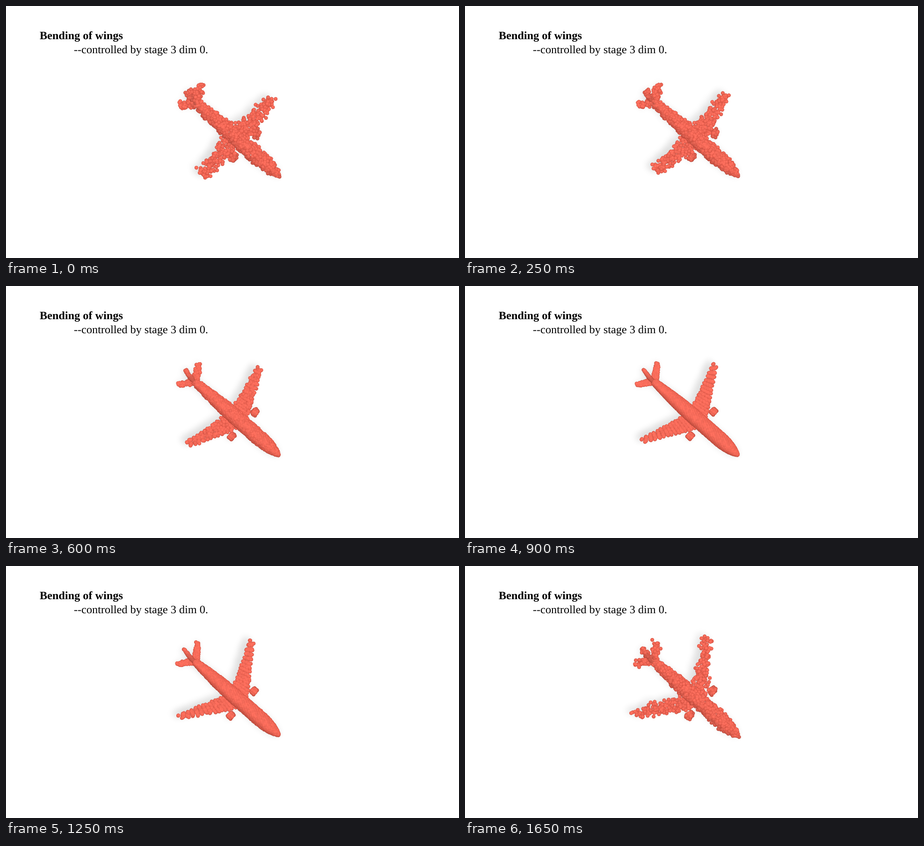
Animation of 968x539 px, one loop 1.7 s. Source, as a matplotlib script:

```python
import numpy as np
import matplotlib.pyplot as plt
from matplotlib.animation import FuncAnimation

plt.rcParams["text.hinting"] = "none"

W, H, DPI = 968, 539, 64
PT = 72 / DPI
TICK = 50

# Poses advance every tick, with a few short and long holds.
POSES, CLEAN = 22, 11
holds = np.ones(POSES, int)
holds[[0, 2, 10, 14, 15, 20]] = 2
holds[[3, 8, 11]] = 3
TIMELINE = np.repeat(np.arange(POSES), holds)

# Plane frame on screen: centre, direction to the nose, direction to one wing.
CENTER = np.array([491, 281])
FORWARD = np.array([0.74, 0.673])
SIDE = np.array([0.69, -0.725])
CAST = np.array([-10, -5])

R = 4.0
# Each ball is a stack of discs, from its dark rim to its lit top.
SHARES = np.array([1, 0.93, 0.8, 0.56])
RIM, TOP = np.array([204, 74, 58]) / 255, np.array([255, 112, 94]) / 255

rng = np.random.default_rng(7)
parts = []


def spread_evenly(n):
    """Low-discrepancy points in the unit square."""
    i = np.arange(1, n + 1)
    return (i * 0.7548777) % 1, (i * 0.5698403) % 1


def mix(a, b, t):
    return a + (b - a) * t


def add(along, across, z, sweep=0, noise=2, shade=1, cast=0.3):
    """Register balls; `sweep` is how far each one swings forward."""
    parts.append(np.broadcast_arrays(along, across, z, sweep, noise, shade, cast))


def add_plate(n, root, tip, sweep, z, noise, shade=(1, 1), cast=0.3, taper=0.5):
    """Tapered plate; root and tip are (rear, front, across)."""
    r, v = spread_evenly(n)
    u = (1 - np.sqrt(1 - r * (1 - taper ** 2))) / (1 - taper)
    along = mix(mix(root[0], root[1], v), mix(tip[0], tip[1], v), u)
    add(along, mix(root[2], tip[2], u), z + 2 * u, sweep * u,
        mix(*noise, u), mix(*shade, u), cast)


def add_body(n):
    t, a = spread_evenly(n)
    turn = np.radians(190) * (a - 0.5)
    rear = 0.35 + 0.65 * np.sin(np.pi / 2 * np.minimum(1, t / 0.5))
    nose = (1 - np.clip((t - 0.78) / 0.22, 0, 1) ** 2) ** 0.75
    half = 13.3 * rear * nose
    along = mix(-116, 122, t)
    add(along, 0.018 * along + half * np.sin(turn), 6 + half * np.cos(turn),
        noise=2.1, shade=1 - 0.2 * np.clip(-np.sin(turn) - 0.35, 0, 1))


def add_engine(n, side):
    t, a = spread_evenly(n)
    ring = 2 * np.pi * a
    add(mix(13, 23, t), side * 36 + 5.5 * np.cos(ring), 5 * np.sin(ring) - 5,
        sweep=9, shade=0.92 + 0.08 * np.sin(ring))


add_body(760)
for side in (1, -1):
    add_plate(190, (-19, 20, side * 13), (-73, -63, side * 112), 70, 3,
              (3, 5), cast=1)
    add_plate(46, (-126, -112, side * 4), (-146, -138, side * 33), 12, 4, (3, 4))
    add_engine(30, side)
add_plate(70, (-130, -107, -4), (-156, -150, 2), 12, 9, (1.5, 3), (0.8, 1))

along, across, depth, sweep, noise, shade, cast = np.hstack(
    [np.array(p, float) for p in parts])
N = len(along)
jitter_early, jitter_late = np.clip(rng.standard_t(6, (2, N, 3)), -2.6, 2.6)
shade = shade * rng.uniform(0.95, 1.01, N)

lift = R * np.sqrt(1 - SHARES ** 2)
tint = mix(RIM, TOP, (lift / lift.max())[:, None] ** 0.8)
shift = 0.5 * np.outer((lift / lift.max()) ** 2, (0.5, -1))
disc_size = np.repeat((2 * R * SHARES * PT) ** 2, N)
disc_color = np.clip(tint[:, None] * shade[:, None], 0, 1).reshape(-1, 3)


def pose(k):
    """Screen positions and heights of the balls in pose k."""
    swing = (1 - k / (POSES - 1)) ** 1.56
    xy = (CENTER + np.outer(along + sweep * swing, FORWARD)
          + np.outer(across, SIDE))
    if k <= CLEAN:
        move = jitter_early * (1 - k / CLEAN)
    else:
        move = 0.8 * jitter_late * ((k - CLEAN) / (POSES - 1 - CLEAN)) ** 2
    move = move * noise[:, None]
    return xy + move[:, :2], depth + move[:, 2]


X0, X1, Y0, Y1, CELL = 300, 639, 120, 420, 3
xe, ye = np.arange(X0, X1 + 1, CELL), np.arange(Y0, Y1 + 1, CELL)


def blur_matrix(n, sigma=7):
    d = np.subtract.outer(np.arange(n), np.arange(n)) * CELL
    g = np.exp(-d ** 2 / (2 * sigma ** 2))
    return g / g.sum(1).max()


BX, BY = blur_matrix(len(xe) - 1), blur_matrix(len(ye) - 1)


def shadow(xy):
    x, y = (xy + np.outer(cast, CAST)).T
    dens = np.histogram2d(y, x, bins=(ye, xe), weights=cast)[0]
    return 1 - 0.17 * (1 - np.exp(-2 * (BY @ dens @ BX)))


fig = plt.figure(figsize=(W / DPI, H / DPI), dpi=DPI, facecolor="white")
ax = fig.add_axes([0, 0, 1, 1])
ax.axis("off")
ground = ax.imshow(np.ones((len(ye) - 1, len(xe) - 1)), cmap="gray", vmin=0,
                   vmax=1, extent=(X0, X1, Y1, Y0), aspect="auto",
                   interpolation="bilinear", zorder=0)
balls = ax.scatter(*np.zeros((2, len(disc_size))), s=disc_size, c=disc_color,
                   linewidths=0, zorder=1)
ax.set_xlim(0, W)
ax.set_ylim(H, 0)

font = dict(family="Liberation Serif", size=24.2 * PT, color="black",
            va="baseline", ha="left")
ax.text(72, 72, "Bending of wings", weight="bold", **font)
ax.text(144.8, 100.5, "--controlled by stage 3 dim 0.", **font)


def draw(tick):
    xy, z = pose(TIMELINE[tick])
    # Sorting discs by height lets neighbouring balls merge like solid spheres.
    order = np.argsort((lift[:, None] + z).ravel(), kind="stable")
    discs = (xy + shift[:, None]).reshape(-1, 2)
    balls.set_offsets(discs[order])
    balls.set_sizes(disc_size[order], fig.dpi)
    balls.set_facecolors(disc_color[order])
    ground.set_data(shadow(xy))
    return ground, balls


anim = FuncAnimation(fig, draw, frames=len(TIMELINE), interval=TICK,
                     repeat=True, repeat_delay=0)
plt.show()
```
